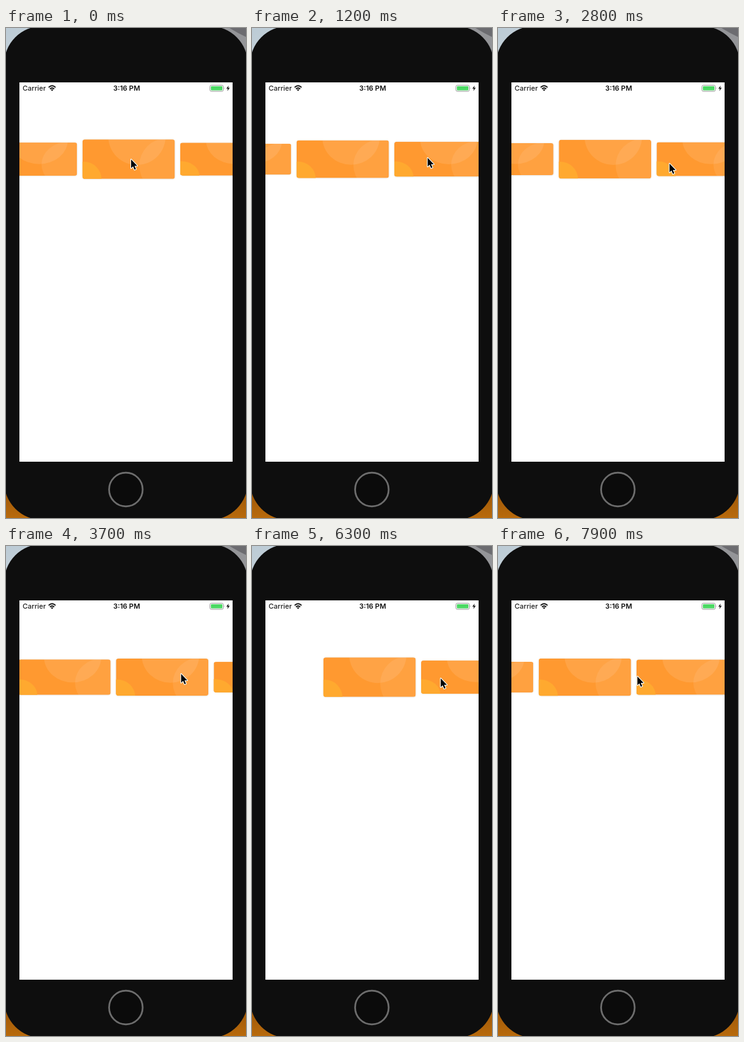
Recreate the animation shown at these times as an HTML page. Size 376 px wide and 766 px high, loop 8 s.

```html
<!DOCTYPE html>
<html lang="en">
<head>
<meta charset="utf-8">
<title>Card carousel</title>
<style>
  html, body { margin: 0; width: 100%; height: 100%; overflow: hidden; background: #0e0e0e; }
  svg { display: block; width: 376px; height: 766px; }
  text { font: 500 11px Inter, "Liberation Sans", sans-serif; fill: #222; }
  .time { font-weight: 600; fill: #111; }
</style>
</head>
<body>
<svg viewBox="0 0 376 766">
  <defs>
    <linearGradient id="sky" x2="1" y2="1">
      <stop offset="0" stop-color="#bccbd5"/>
      <stop offset="1" stop-color="#d6dfe3"/>
    </linearGradient>
    <linearGradient id="wood" x2="0" y2="1">
      <stop offset="0" stop-color="#8a4a05"/>
      <stop offset="1" stop-color="#b86a0c"/>
    </linearGradient>
    <filter id="soft" x="-10%" y="-20%" width="120%" height="140%">
      <feGaussianBlur stdDeviation="1"/>
    </filter>
    <clipPath id="screen"><rect x="21" y="85" width="334" height="593"/></clipPath>
    <clipPath id="face"><rect width="144.7" height="62" rx="4"/></clipPath>
    <g id="card">
      <rect y=".4" width="144.7" height="62" rx="4" fill="#000" opacity=".12" filter="url(#soft)"/>
      <g clip-path="url(#face)">
        <rect width="144.7" height="62" fill="#ff9930"/>
        <g fill="#fff">
          <circle cx="85.3" cy="-4.8" r="45" fill-opacity=".1"/>
          <circle cx="131.5" cy="41" r="42.5" fill-opacity=".08"/>
        </g>
        <circle cx="2" cy="63" r="28" fill="#ffa92f"/>
      </g>
    </g>
  </defs>

  <!-- desk behind the phone -->
  <rect width="188" height="90" fill="url(#sky)"/>
  <rect x="188" width="188" height="90" fill="#949598"/>
  <path d="M350 0H376V14L364 8Z" fill="#6c6c70"/>
  <rect y="690" width="376" height="76" fill="url(#wood)"/>

  <rect x="-3" y="-3" width="382" height="772" rx="60" fill="#0e0e0e"/>
  <circle cx="187.8" cy="721.5" r="26.3" fill="#0b0b0b" stroke="#6d6d6d" stroke-width="2.7"/>
  <rect x="21" y="85" width="334" height="593" fill="#fff"/>

  <!-- status bar -->
  <text x="26" y="98">Carrier</text>
  <text class="time" x="189" y="98" text-anchor="middle">3:16 PM</text>
  <g fill="none" stroke="#111" stroke-width="1.9">
    <path d="M66.8 92.9Q72.2 87.7 77.6 92.9"/>
    <path d="M68.9 95.2Q72.2 92.1 75.5 95.2"/>
  </g>
  <path d="M72.2 98.6L70.2 96.6Q72.2 95 74.2 96.6Z" fill="#111"/>
  <rect x="319.5" y="89.5" width="21" height="9.5" rx="2.2" fill="#fff" stroke="#9a9a9a"/>
  <rect x="321" y="91" width="18" height="6.5" rx="1" fill="#4cd964"/>
  <path d="M341.8 92.6Q343.4 94.2 341.8 95.8Z" fill="#9a9a9a"/>
  <path d="M348.8 90L345.2 94.8H347.6L346.8 98.4L350.6 93.5H348.1Z" fill="#111"/>

  <g id="list" clip-path="url(#screen)"></g>
  <path id="cursor" d="M0 0V13.6L3.1 10.7L5.4 16L7.5 15.1L5.3 9.9H9.6Z"
        stroke="#fff" stroke-width="2.2" stroke-linejoin="round" paint-order="stroke"/>
</svg>
<script>
const LOOP = 8000, STEP = 100;
const COUNT = 6, PITCH = 153.2, HEIGHT = 62;
const REST = 116, MIDDLE = 205, SHRINK = 0.068;

// [time, left edge of the first card]
const scroll = [
  [0, -33.4], [1200, -83.4], [2800, -57.9], [4700, 109.3],
  [5200, 10], [5400, 24], [5900, 106], [6300, 111.8], [7000, -14.7], [7900, -89.4]
];
// [time, x, y]
const pointer = [
  [0, 196, 205.5], [1200, 275.2, 203], [2800, 268.7, 212], [4700, 281, 186],
  [5200, 184, 192], [6300, 295.7, 207], [7000, 219.2, 204], [7900, 218.4, 204]
];

const list = document.getElementById("list");
const cursor = document.getElementById("cursor");
const cards = Array.from({ length: COUNT }, () => {
  const use = document.createElementNS("http://www.w3.org/2000/svg", "use");
  use.setAttribute("href", "#card");
  return list.appendChild(use);
});

function sample(keys, t) {
  const i = keys.findIndex(k => k[0] > t);
  if (i < 0) return keys[keys.length - 1].slice(1);
  const a = keys[i - 1], b = keys[i];
  const p = (t - a[0]) / (b[0] - a[0]);
  const e = p * p * (3 - 2 * p);
  return a.slice(1).map((v, n) => v + (b[n + 1] - v) * e);
}

function draw(now) {
  const t = Math.floor((now % LOOP) / STEP) * STEP;
  const [first] = sample(scroll, t);
  cards.forEach((card, i) => {
    const x = first + i * PITCH;
    // cards get flatter away from the middle
    const h = Math.max(40, HEIGHT - SHRINK * Math.abs(x - REST));
    card.setAttribute("transform", `translate(${x} ${MIDDLE - h / 2}) scale(1 ${h / HEIGHT})`);
  });
  cursor.setAttribute("transform", `translate(${sample(pointer, t).join(" ")})`);
}

const start = performance.now();
function tick() {
  draw(performance.now() - start);
  requestAnimationFrame(tick);
}
tick();
</script>
</body>
</html>
```
